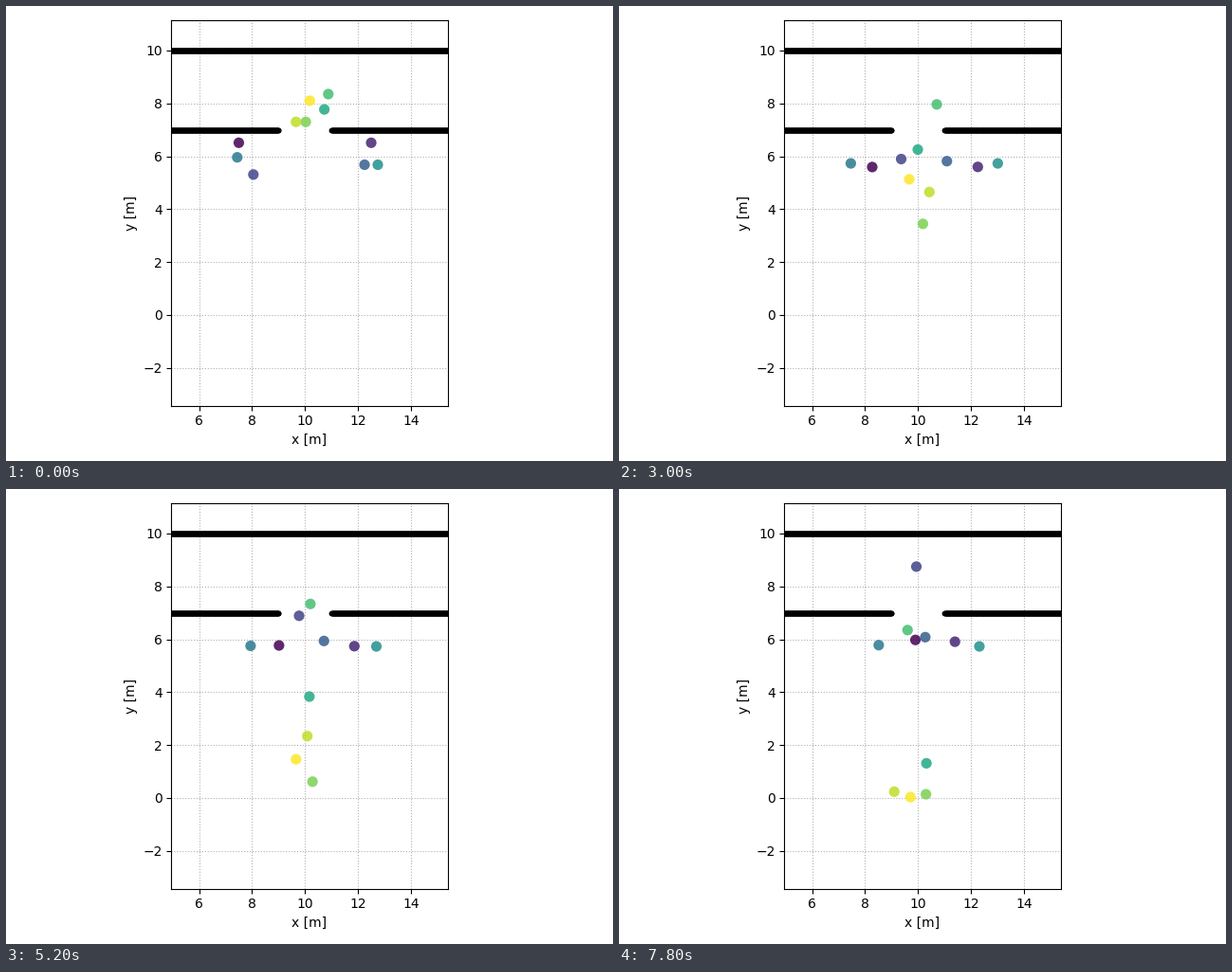
A matplotlib script that plays this animation: 640x480 px, repeating every 8000 ms.

```python
import numpy as np
import matplotlib.pyplot as plt
from matplotlib.animation import FuncAnimation

FRAMES, STEP = 40, 200  # 8 s loop
SETTLE = 0.5            # seconds a walker needs to fall into its lane


def walker(start, lane, drift, bend=0, stop=np.inf):
    """Positions x + iy in metres: a curved lane, joined from the start, left at stop."""
    t = np.minimum(np.arange(FRAMES) * STEP / 1000, stop)
    return lane + drift * t + bend * t**2 + (start - lane) * np.exp(-t / SETTLE)


WALKERS = np.array([
    # waiting below the door and closing in on it
    walker(7.50 + 6.51j, 7.25 + 5.35j, 0.34 + 0.08j),
    walker(12.50 + 6.51j, 12.80 + 5.40j, -0.18 + 0.065j),
    walker(8.05 + 5.31j, 8.40 + 5.40j, 0.40, -0.026 + 0.055j),
    walker(12.25 + 5.68j, 11.60 + 5.65j, -0.17 + 0.055j),
    walker(7.44 + 5.96j, 6.80 + 5.70j, 0.22 + 0.01j),
    walker(12.75 + 5.68j, 13.45 + 5.73j, -0.145),
    # coming out through the door
    walker(10.73 + 7.77j, 9.75 + 8.70j, 0.08 - 0.65j, -0.055j, stop=7.1),
    walker(10.88 + 8.35j, 11.40 + 8.50j, -0.23 - 0.12j, -0.02j),
    walker(10.03 + 7.30j, 10.05 + 7.30j, 0.045 - 1.285j, stop=5.57),
    walker(9.66 + 7.30j, 9.65 + 7.80j, 0.50 - 1.05j, -0.08, stop=7.2),
    walker(10.18 + 8.10j, 10.15 + 8.10j, -0.25 - 0.60j, 0.03 - 0.13j, stop=5.9),
])

fig, ax = plt.subplots(figsize=(6.4, 4.8), dpi=100)
ax.set_aspect("equal")
ax.set(xlim=(4.95, 15.39), ylim=(-3.43, 11.142), xlabel="x [m]", ylabel="y [m]")
ax.set_xticks(range(6, 15, 2))
ax.set_yticks(range(-2, 11, 2))
ax.grid(linestyle=":")

for left, right, y in [(4, 16, 10), (4, 9, 7), (11, 16, 7)]:
    x = np.arange(left, right + 0.005, 0.01)
    ax.plot(x, np.full_like(x, y), "k.")

dots = ax.scatter(WALKERS[:, 0].real, WALKERS[:, 0].imag, c=range(len(WALKERS)),
                  s=65, linewidths=0, cmap="viridis", alpha=0.85, zorder=3)
fig.tight_layout()


def draw(i):
    now = WALKERS[:, i]
    dots.set_offsets(np.column_stack([now.real, now.imag]))
    return (dots,)


anim = FuncAnimation(fig, draw, frames=FRAMES, interval=STEP, repeat=True, repeat_delay=0)
plt.show()
```
